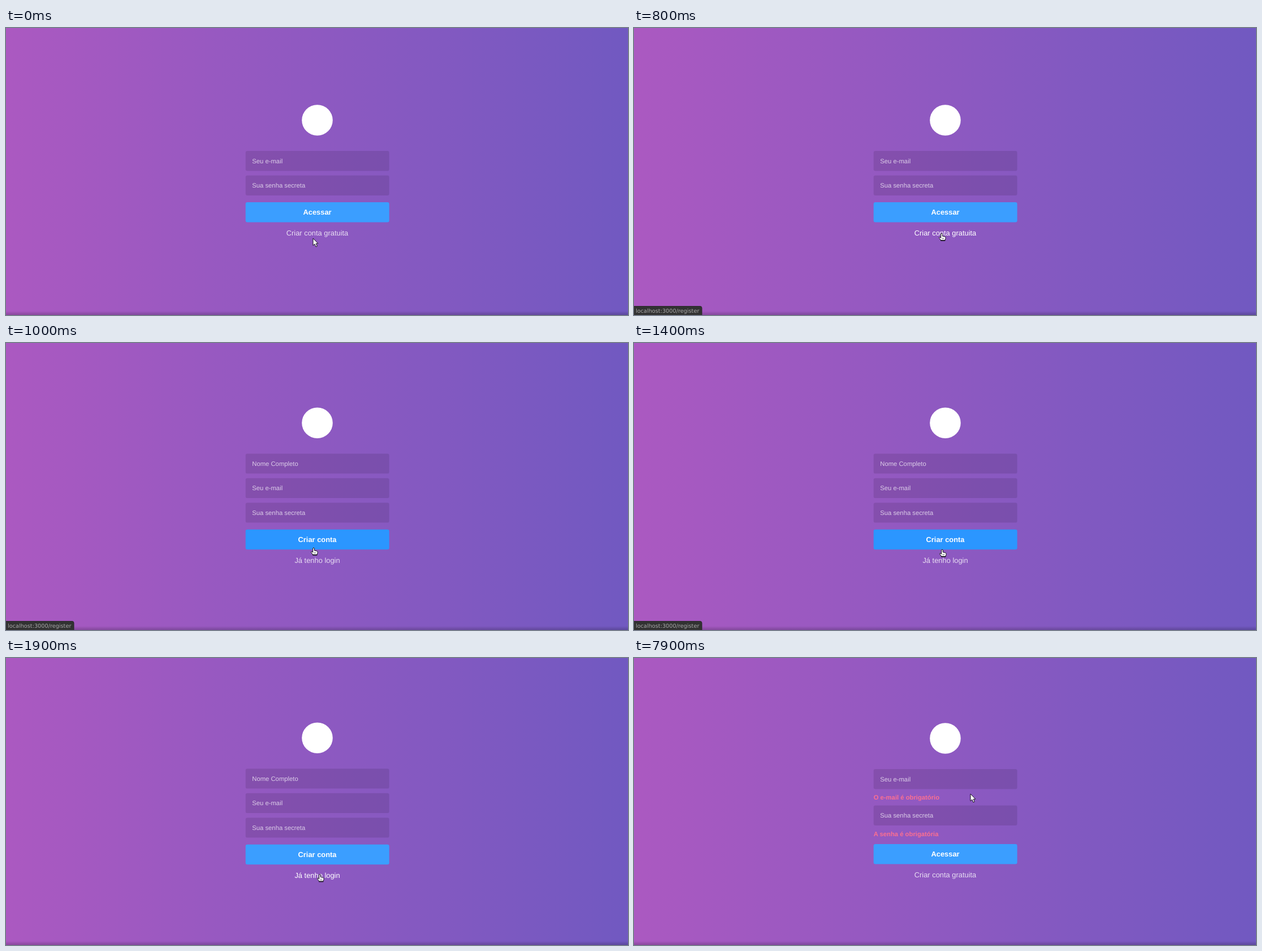
Animation of 1100 by 509 pixels, one loop 8000 ms. Source, as an HTML page:

```html
<!DOCTYPE html>
<html lang="pt-BR">
<head>
<meta charset="utf-8">
<title>Login</title>
<style>
html, body { margin: 0; width: 100%; height: 100%; overflow: hidden; background: #8e59c1; }
svg { display: block; width: 1100px; height: 509px; font-family: "Liberation Sans", Arial, sans-serif; text-rendering: geometricPrecision; cursor: default; }
.field { fill: #000; fill-opacity: .1; }
.hint { fill: #fff; fill-opacity: .7; font-size: 11.27px; }
.error { fill: #fb6f91; font-size: 11.27px; font-weight: bold; }
.button { fill: #3b9eff; }
.label, .link { fill: #fff; font-size: 12.88px; text-anchor: middle; }
.label { font-weight: bold; }
.link { fill-opacity: .8; }
.status text { fill: #a9a9a9; font: 9.72px "DejaVu Sans", sans-serif; }
.status path { fill: #323232; stroke: #282828; }

#login, #join, #invalid, .status, #arrow, #hand, #pointer, .link, .button {
  animation: 8s step-end infinite;
}
#login { animation-name: login; }
#join { animation-name: join; }
#invalid { animation-name: invalid; }
#register { animation-name: register; }
#home { animation-name: home; }
#arrow { animation-name: arrow; }
#hand { animation-name: hand; }
#pointer { animation-name: move; }
#login .link { animation-name: login-link; }
#join .link { animation-name: join-link; }
#join .button { animation-name: join-button; }

@keyframes login { 0% { opacity: 1 } 12.5%, 100% { opacity: 0 } }
@keyframes join { 0% { opacity: 0 } 12.5% { opacity: 1 } 98.75%, 100% { opacity: 0 } }
@keyframes invalid { 0% { opacity: 0 } 98.75%, 100% { opacity: 1 } }
@keyframes register { 0% { opacity: 0 } 8.75% { opacity: 1 } 18.75%, 100% { opacity: 0 } }
@keyframes home { 0% { opacity: 0 } 25% { opacity: 1 } 98.75%, 100% { opacity: 0 } }
@keyframes login-link { 0% { fill-opacity: .8 } 6.25%, 100% { fill-opacity: 1 } }
@keyframes join-link { 0% { fill-opacity: .8 } 22.5%, 100% { fill-opacity: 1 } }
@keyframes join-button { 0% { fill: #2b96ff } 18.75%, 100% { fill: #3b9eff } }
@keyframes arrow {
  0% { opacity: 1 } 6.25% { opacity: 0 } 11.25% { opacity: 1 } 12.5% { opacity: 0 }
  18.75% { opacity: 1 } 21.25% { opacity: 0 } 98.75%, 100% { opacity: 1 }
}
@keyframes hand {
  0% { opacity: 0 } 6.25% { opacity: 1 } 11.25% { opacity: 0 } 12.5% { opacity: 1 }
  18.75% { opacity: 0 } 21.25% { opacity: 1 } 98.75%, 100% { opacity: 0 }
}
@keyframes move {
  0% { transform: translate(543px, 373px) }
  1.25% { transform: translate(543px, 370px) }
  6.25% { transform: translate(544px, 364.5px) }
  7.5% { transform: translate(544px, 364px) }
  11.25% { transform: translate(543px, 363.5px) }
  12.5% { transform: translate(544px, 363px) }
  16.25% { transform: translate(544px, 364.5px) }
  17.5% { transform: translate(545px, 366px) }
  18.75% { transform: translate(546px, 370px) }
  20% { transform: translate(548px, 375px) }
  21.25% { transform: translate(551px, 380px) }
  22.5% { transform: translate(553px, 382px) }
  23.75% { transform: translate(555px, 383.5px) }
  25% { transform: translate(556px, 384.5px) }
  26.25% { transform: translate(557px, 385px) }
  98.75%, 100% { transform: translate(595px, 241px) }
}
</style>
</head>
<body>
<svg viewBox="0 0 1100 509">
  <defs>
    <linearGradient id="sky"><stop stop-color="#ab59c1"/><stop offset="1" stop-color="#7159c1"/></linearGradient>
    <linearGradient id="shade" x2="0" y2="1"><stop stop-opacity="0"/><stop offset="1" stop-opacity=".2"/></linearGradient>
  </defs>
  <rect width="1100" height="509" fill="url(#sky)"/>
  <rect y="502" width="1100" height="7" fill="url(#shade)"/>
  <g id="login"></g>
  <g id="join"></g>
  <g id="invalid"></g>
  <g id="register" class="status"></g>
  <g id="home" class="status"></g>
  <g id="pointer" stroke-linejoin="round">
    <path id="arrow" d="M0 0V12.6L2.9 10 5 15 7.3 14 5.2 9.2H8.9Z" fill="#fff" stroke="#15101c"/>
    <g id="hand">
      <path d="M-1.3 1Q0-.7 1.3 1V5L5.8 6Q7 6.3 7 7.5V9.5L6 12V13H-1.5V12L-4.5 8.2Q-4.5 6.6-3 7L-1.3 8.4Z" fill="#fff" stroke="#15101c"/>
      <path d="M-1.7 12.7H6.3" stroke="#15101c" stroke-width="1.6"/>
      <path d="M1.3 8V10.5M3.3 8V10.5" stroke="#15101c" stroke-width=".6"/>
    </g>
  </g>
</svg>
<script>
const LEFT = 423.7, MID = 550.5;
const fill = (id, html) => { document.getElementById(id).innerHTML = html; };
const text = (cls, x, y, s) => `<text class="${cls}" x="${x}" y="${y}">${s}</text>`;
const box = (cls, y) => `<rect class="${cls}" x="${LEFT}" y="${y}" width="254" height="35.4" rx="3.2"/>`;
const logo = y => `<circle cx="${MID}" cy="${y}" r="27.3" fill="#fff"/>`;
const field = (y, s) => box('field', y) + text('hint', 435.3, y + 21.6, s);
const error = (y, s) => text('error', LEFT, y, s);
const actions = (y, button, link) =>
  box('button', y) + text('label', MID, y + 22.1, button) + text('link', MID, y + 58.9, link);
const status = (w, s) =>
  `<path d="M-2 493.5H${w - 3}Q${w} 493.5 ${w} 496.5V511H-2Z"/>` + text('', 3, 505, s);

const MAIL = 'Seu e-mail', PASS = 'Sua senha secreta';
const ENTER = ['Acessar', 'Criar conta gratuita'];

fill('login', logo(163.5) + field(218, MAIL) + field(261.6, PASS) + actions(309, ...ENTER));
fill('join', logo(141.7) + field(196.2, 'Nome Completo') + field(239.7, MAIL) + field(283.2, PASS) +
  actions(330.8, 'Criar conta', 'Já tenho login'));
fill('invalid', logo(142.5) + field(197, MAIL) + error(251, 'O e-mail é obrigatório') +
  field(261.6, PASS) + error(315.5, 'A senha é obrigatória') + actions(330, ...ENTER));
fill('register', status(120, 'localhost:3000/register'));
fill('home', status(79.5, 'localhost:3000'));
</script>
</body>
</html>
```
